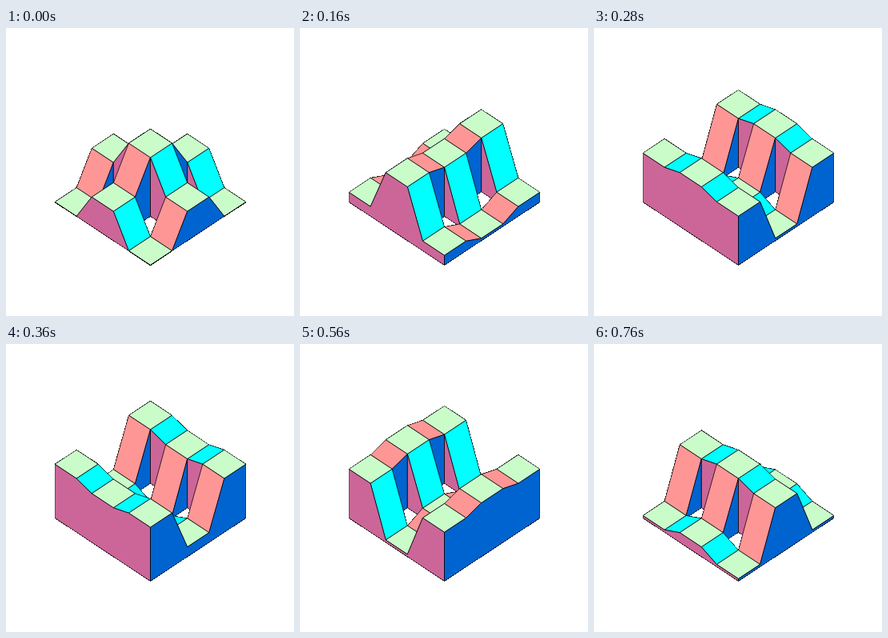
Write an HTML page with a canvas that moves like this. It is 360 px wide and 360 px high and loops after 0.8 s.

```html
<!DOCTYPE html>
<html>
<head>
<meta charset="utf-8">
<style>
html, body { margin: 0; height: 100%; overflow: hidden; background: #fff; }
canvas { display: block; }
</style>
</head>
<body>
<canvas id="stage" width="360" height="360"></canvas>
<script>
const ctx = document.getElementById('stage').getContext('2d', { willReadFrequently: true });
const LOOP = 800, STEPS = 16, UNIT = 73.4 / 24;
const RISE = [0, 1, 2, 4, 12, 20, 21, 22, 24];
const SIDE = 119.5, TILE = 27.1, GAP = (SIDE - 3 * TILE) / 2;
const EDGE = [0, TILE, TILE + GAP, 2 * TILE + GAP, SIDE - TILE, SIDE];
const TOP = '#cafcca', ALONG = '#00ffff', ACROSS = '#ff9696', LEFT = '#cc6699', RIGHT = '#0064d0';

// Height of a pillar: corners, two pairs of sides and the centre run a quarter loop apart
function pillar(i, j, step) {
  const shift = i === 1 ? (j === 1 ? 8 : 4) : (j === 1 ? 12 : 0);
  const k = (step + shift) % STEPS;
  return RISE[Math.min(k, STEPS - k)] * UNIT;
}

function project(a, b, h) {
  return [61 + a + b, 217.5 + (a - b) * 79 / SIDE - h];
}

function face(color, points) {
  ctx.beginPath();
  for (const p of points) ctx.lineTo(...project(...p));
  ctx.closePath();
  ctx.fillStyle = color;
  ctx.fill();
  ctx.stroke();
}

// Outer contour without half-transparent pixels
function hardenContour() {
  const image = ctx.getImageData(0, 0, 360, 360);
  for (let k = 3; k < image.data.length; k += 4) image.data[k] = image.data[k] < 128 ? 0 : 255;
  ctx.putImageData(image, 0, 0);
}

function draw(step) {
  ctx.clearRect(0, 0, 360, 360);
  ctx.lineWidth = 0.75;
  ctx.lineJoin = 'round';
  const height = (m, n) => pillar(m >> 1, n >> 1, step);
  const vertex = (m, n) => [EDGE[m], EDGE[n], height(m, n)];
  const ground = (m, n) => [EDGE[m], EDGE[n], 0];

  // Back to front; cells odd in both directions are open shafts
  for (let m = 0; m < 5; m++) {
    for (let n = 4; n >= 0; n--) {
      const slopeA = m % 2, slopeB = n % 2;
      if (slopeA && slopeB) continue;
      const color = slopeA ? ALONG : slopeB ? ACROSS : TOP;
      face(color, [vertex(m, n), vertex(m + 1, n), vertex(m + 1, n + 1), vertex(m, n + 1)]);
      if (slopeA && n) face(LEFT, [vertex(m, n), vertex(m + 1, n), ground(m + 1, n), ground(m, n)]);
      if (slopeB && m < 4) face(RIGHT, [vertex(m + 1, n), vertex(m + 1, n + 1), ground(m + 1, n + 1), ground(m + 1, n)]);
    }
  }
  const all = EDGE.map((_, k) => k);
  face(LEFT, [...all.map(k => vertex(k, 0)), ground(5, 0), ground(0, 0)]);
  face(RIGHT, [...all.map(k => vertex(5, k)), ground(5, 5), ground(5, 0)]);
  hardenContour();
}

function tick() {
  draw(Math.floor(performance.now() % LOOP / LOOP * STEPS));
  requestAnimationFrame(tick);
}
tick();
</script>
</body>
</html>
```
